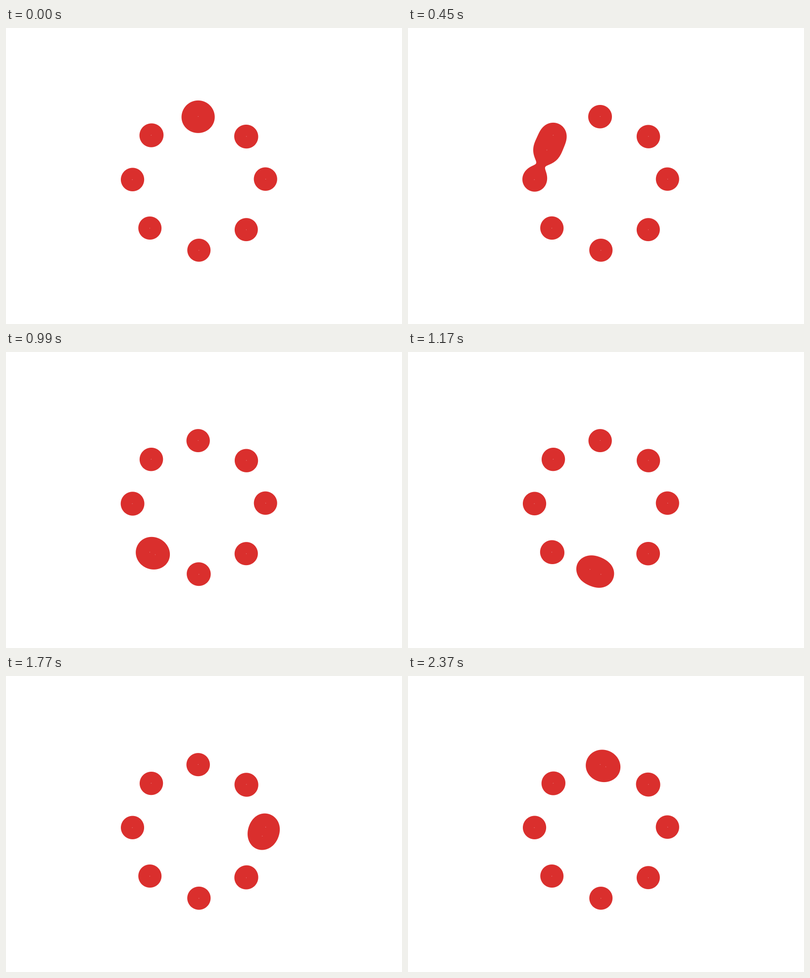
Write an HTML page with a canvas that moves like this. It is 800 by 600 pixels and loops after 2.4 s.

```html
<!DOCTYPE html>
<html lang="en">
<head>
<meta charset="utf-8">
<title>Metaball loader</title>
<style>
  html, body { margin: 0; width: 800px; height: 600px; overflow: hidden; background: #fff; }
  canvas { display: block; }
</style>
</head>
<body>
<canvas id="stage" width="800" height="600"></canvas>
<script>
  const LOOP = 2400, STEP = 30, R2 = 21.7 ** 2;
  const COLOR = [218, 47, 45];
  const BOX = { x: 210, y: 135, w: 360, h: 360 };

  // Ring of still balls, in the order the moving ball visits them
  const ring = [
    [388.2, 179.3], [293.3, 217.3], [255.2, 307.3], [290.5, 405.8],
    [389.7, 450.7], [485.6, 408.9], [524.6, 306.4], [485.8, 219.8]
  ];
  // Step at which the moving ball arrives at each ball
  const keys = [0, 11, 20, 29, 38, 47, 55.5, 64.5, 73];

  const ctx = document.getElementById('stage').getContext('2d');
  const img = ctx.createImageData(BOX.w, BOX.h);
  const px = img.data;
  const count = BOX.w * BOX.h;
  for (let i = 0; i < count; i++) px.set(COLOR, i * 4);

  // Adds a ball's inverse-square field and its gradient
  function addBall(f, [bx, by]) {
    let i = 0;
    for (let y = 0; y < BOX.h; y++) {
      const dy = BOX.y + y + 0.5 - by;
      for (let x = 0; x < BOX.w; x++, i++) {
        const dx = BOX.x + x + 0.5 - bx;
        const d2 = dx * dx + dy * dy + 1e-3;
        const v = R2 / d2, g = 2 * v / d2;
        f.v[i] += v;
        f.gx[i] += g * dx;
        f.gy[i] += g * dy;
      }
    }
  }

  const makeField = () => ({
    v: new Float32Array(count), gx: new Float32Array(count), gy: new Float32Array(count)
  });
  const still = makeField(), total = makeField();
  ring.forEach(b => addBall(still, b));

  function moverAt(n) {
    let k = 0;
    while (k < 7 && n >= keys[k + 1]) k++;
    const u = (n - keys[k]) / (keys[k + 1] - keys[k]);
    const a = ring[k], b = ring[(k + 1) % 8];
    return [a[0] + (b[0] - a[0]) * u, a[1] + (b[1] - a[1]) * u];
  }

  function draw(n) {
    for (const c in total) total[c].set(still[c]);
    addBall(total, moverAt(n));
    const { v, gx, gy } = total;
    for (let i = 0; i < count; i++) {
      const slope = Math.hypot(gx[i], gy[i]) + 1e-6;
      px[i * 4 + 3] = 255 * Math.min(1, Math.max(0, (v[i] - 1) / slope + 0.5));
    }
    ctx.putImageData(img, BOX.x, BOX.y);
  }

  const start = performance.now();
  let shown = -1;

  function tick() {
    const i = Math.floor((performance.now() - start) % LOOP / STEP);
    // Every tenth tick holds the pose
    const n = i - Math.max(0, Math.floor((i - 2) / 10));
    if (n !== shown) draw(shown = n);
    requestAnimationFrame(tick);
  }
  tick();
</script>
</body>
</html>
```
